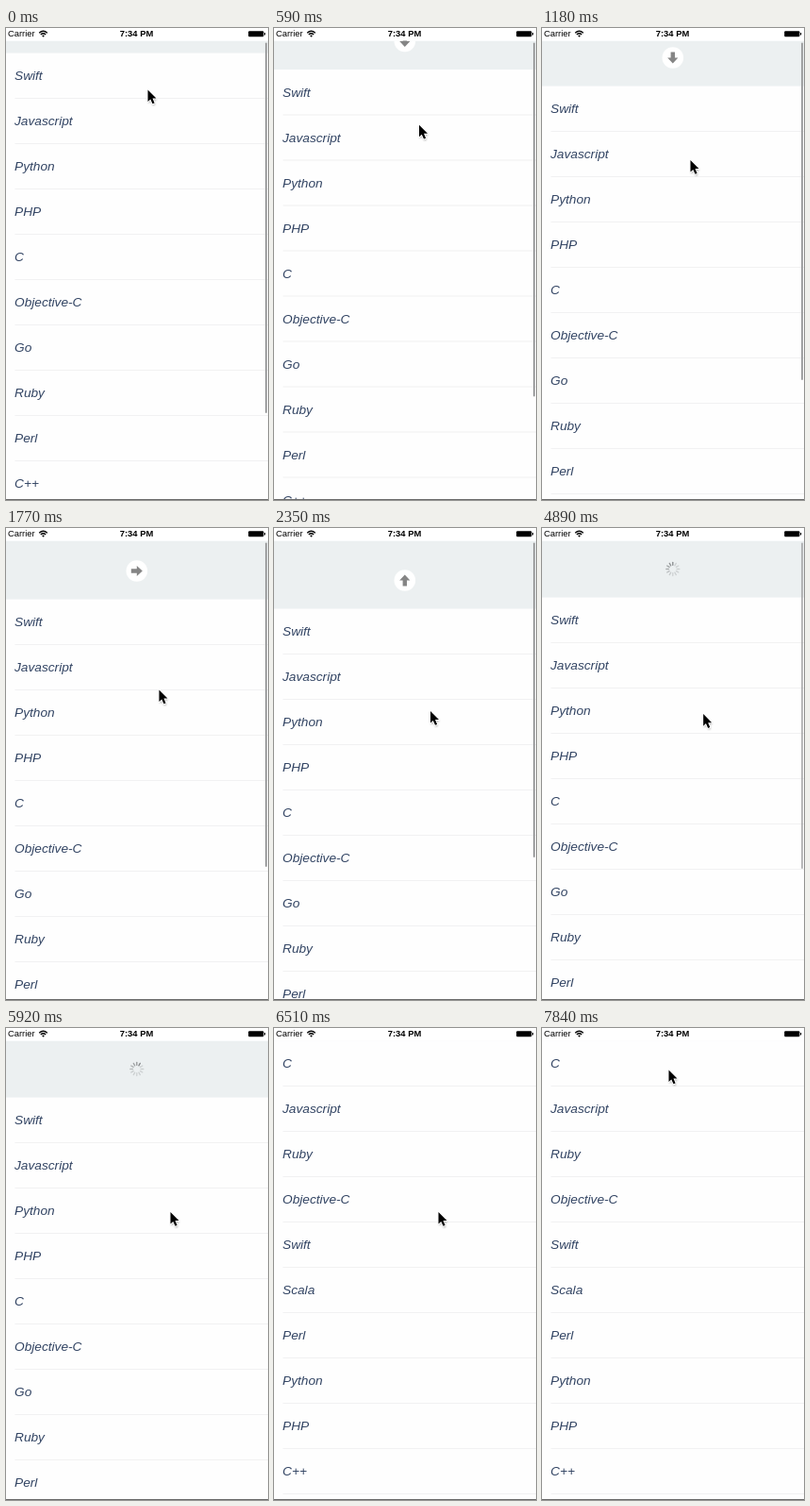
Animation, 278 px wide and 500 px high, one loop 7990 ms. Source, as an HTML page:

```html
<!DOCTYPE html>
<html lang="en">
<head>
<meta charset="utf-8">
<title>Pull to refresh</title>
<style>
  html, body { margin: 0; width: 100%; height: 100%; overflow: hidden; background: #fff; }
  svg { display: block; width: 278px; height: 500px; }
  text { font-family: "Liberation Sans", Arial, sans-serif; }
  .row text { font-size: 13.7px; font-style: italic; fill: #324463; }
  .row rect { fill: #f1f1f2; }
  .status { font-size: 9.4px; }
</style>
</head>
<body>
<svg viewBox="0 0 278 500">
  <defs>
    <clipPath id="page"><rect y="13.5" width="278" height="485.5"/></clipPath>
    <filter id="soft" x="-50%" y="-50%" width="200%" height="200%"><feGaussianBlur stdDeviation="1"/></filter>
    <path id="pointer" d="M0 0V12.6L2.8 9.9L5 14.8L7.1 13.9L5 9.1H9Z"/>
  </defs>
  <rect width="278" height="500" fill="#fff"/>
  <g clip-path="url(#page)">
    <rect y="13.5" width="278" height="486.5" fill="#ecf0f1"/>
    <g id="list">
      <g id="badge" transform="translate(138.8 -30)">
        <circle r="11.3" fill="#fff"/>
        <path id="arrow" d="M0 -6L5.6 0H2.2V6H-2.2V0H-5.6Z" fill="#858585"/>
      </g>
      <g id="spinner" transform="translate(138.8 -30)" stroke="#85888a" stroke-width="1.3" stroke-linecap="round"></g>
      <rect width="278" height="520" fill="#fefefe"/>
      <g id="rows"></g>
    </g>
    <rect id="bar" x="275" y="15.5" width="2" rx="1" fill="#a0a1a2"/>
  </g>
  <g class="status">
    <text x="2" y="9.2">Carrier</text>
    <text x="138.5" y="9.2" text-anchor="middle" font-weight="bold">7:34 PM</text>
  </g>
  <g fill="none" stroke="#000" stroke-width="1.3">
    <path d="M35.2 5.2Q39.5 1.4 43.8 5.2"/>
    <path d="M36.8 7Q39.5 4.6 42.2 7"/>
    <path d="M38.1 8.1Q39.5 7 40.9 8.1L39.5 9.7Z" fill="#000" stroke="none"/>
  </g>
  <rect x="257.2" y="3.3" width="16.2" height="6" rx="1" fill="#000"/>
  <rect x="274" y="5" width="1.2" height="2.6" rx=".6" fill="#000"/>
  <rect y="499" width="278" height="1" fill="#6a6a6a"/>
  <g id="cursor">
    <use href="#pointer" x=".6" y="1.6" opacity=".45" filter="url(#soft)"/>
    <use href="#pointer" stroke="#fff" stroke-width="2" stroke-linejoin="round"/>
    <use href="#pointer"/>
  </g>
</svg>
<script>
const LOOP = 7990, STEPS = 54, TICK = LOOP / STEPS;
const RELEASE = 31, RELOAD = 42;
const before = ["Swift", "Javascript", "Python", "PHP", "C", "Objective-C", "Go", "Ruby", "Perl", "C++"];
const after = ["C", "Javascript", "Ruby", "Objective-C", "Swift", "Scala", "Perl", "Python", "PHP", "C++"];

// Tracks are [step, value] pairs, linear in between
const pull = [[0, 13], [8, 48], [12, 62], [16, 72], [17, 73], [18, 74], [21, 74], [22, 74.5], [25, 74.5],
  [26, 75], [27, 75.5], [30, 75.5], [31, 71], [32, 63], [33, 60], [41, 60], [42, 42], [43, 6], [44, 0]];
const turn = [[11, 180], [13, 0]];
const barFade = [[32, 1], [36, 0]];
// Pointer position while it drags, by pull distance
const gripX = [[13, 150.5], [48, 157.5], [72, 166], [75.5, 169]];
const gripY = [[13, 65.5], [48, 140], [72, 194], [75.5, 198.5]];

const $ = id => document.getElementById(id);
const set = (el, name, value) => el.setAttribute(name, value);
const mix = (a, b, u) => a + (b - a) * u;

function at(track, k) {
  const i = track.findIndex(p => p[0] >= k);
  if (i < 0) return track[track.length - 1][1];
  if (i === 0) return track[0][1];
  const [a, b] = [track[i - 1], track[i]];
  return mix(a[1], b[1], (k - a[0]) / (b[0] - a[0]));
}

function ease(from, to, k) {
  const u = Math.min(1, Math.max(0, (k - from) / (to - from)));
  return u * u * (3 - 2 * u);
}

$("rows").innerHTML = before.map((_, i) =>
  `<g class="row" transform="translate(0 ${i * 48})"><text x="9" y="28.5"></text>
   <rect x="9.5" y="47.5" width="268.5" height="1"/></g>`).join("");
const labels = [...document.querySelectorAll(".row text")];

$("spinner").innerHTML = Array.from({ length: 12 }, (_, i) =>
  `<path d="M0 -4.2V-7" transform="rotate(${i * 30})"/>`).join("");
const spokes = [...$("spinner").children];

function cursorAt(k, d) {
  if (k < RELEASE) return [at(gripX, d), at(gripY, d)];
  const drift = ease(30, 37, k), leave = ease(45, 53, k);
  return [mix(mix(169, 174.5, drift), 134.5, leave), mix(mix(198.5, 195, drift), 44.5, leave)];
}

function draw(k) {
  const d = at(pull, k);
  const names = k < RELOAD ? before : after;
  labels.forEach((el, i) => el.textContent = names[i]);
  set($("list"), "transform", `translate(0 ${13.5 + d})`);
  set($("bar"), "height", 405.5 - d);
  set($("bar"), "opacity", at(barFade, k));
  set($("badge"), "opacity", k < RELEASE ? 1 : 0);
  set($("arrow"), "transform", `rotate(${at(turn, k)})`);
  set($("spinner"), "opacity", k < RELEASE ? 0 : 1);
  const head = Math.floor((k - 40) * TICK * 12 / 1000) + 121;
  spokes.forEach((el, i) => set(el, "opacity", Math.max(0.3, 1 - (head - i) % 12 * 0.13)));
  set($("cursor"), "transform", `translate(${cursorAt(k, d)})`);
}

let shown = -1;
function tick() {
  const t = performance.now() % LOOP;
  const k = Math.min(STEPS - 1, Math.floor((t + 18) / TICK));
  if (k !== shown) draw(shown = k);
  requestAnimationFrame(tick);
}
tick();
</script>
</body>
</html>
```
